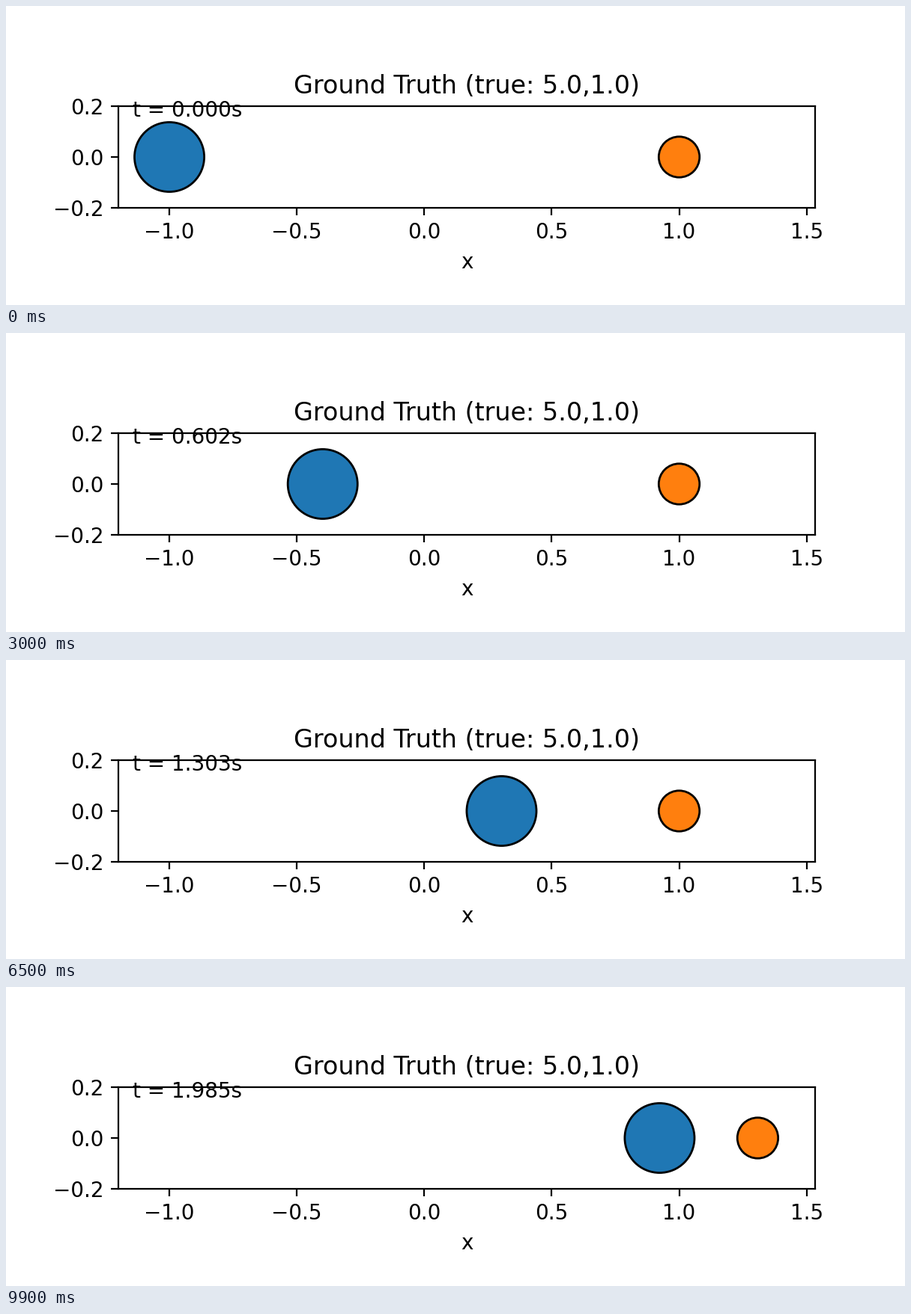
A matplotlib script that plays this animation: 1200x400 px, repeating every 10 s.

```python
import numpy as np
import matplotlib.pyplot as plt
from matplotlib.animation import FuncAnimation
from matplotlib.patches import Circle

FRAMES = 100
INTERVAL = 100
TIME_STEP = 8 / 399
END_TIME = 2.0

M1, M2 = 5.0, 1.0
START1, START2 = -1.0, 1.0
SPEED = 1.0
GAP = 0.2  # centre distance at impact
MARGIN = 0.2

HIT_TIME = (START2 - START1 - GAP) / SPEED
V1 = SPEED * (M1 - M2) / (M1 + M2)
V2 = SPEED * 2 * M1 / (M1 + M2)


def positions(t):
    """Centres of both balls before and after the elastic collision."""
    before, after = min(t, HIT_TIME), max(t - HIT_TIME, 0)
    return START1 + SPEED * before + V1 * after, START2 + V2 * after


def ball(x, mass, color):
    radius = 0.08 * np.cbrt(mass)
    return ax.add_patch(Circle((x, 0), radius, fc=color, ec="black", lw=1))


plt.rcParams["font.family"] = "DejaVu Sans"
fig, ax = plt.subplots(figsize=(6, 2), dpi=200)
ax.set_xlim(START1 - MARGIN, positions(END_TIME)[1] + MARGIN)
ax.set_ylim(-0.2, 0.2)
ax.set_aspect("equal")
ax.set_xticks(np.arange(-2, 4) / 2)
ax.set_yticks([-0.2, 0.0, 0.2])
ax.set_xlabel("x")
ax.set_title(f"Ground Truth (true: {M1},{M2})")

ball1 = ball(START1, M1, "C0")
ball2 = ball(START2, M2, "C1")
clock = ax.text(0.02, 0.9, "", transform=ax.transAxes)


def update(i):
    t = i * TIME_STEP
    x1, x2 = positions(t)
    ball1.center = x1, 0
    ball2.center = x2, 0
    clock.set_text(f"t = {t:.3f}s")
    return ball1, ball2, clock


anim = FuncAnimation(fig, update, frames=FRAMES, interval=INTERVAL,
                     repeat=True, repeat_delay=0)
plt.show()
```
